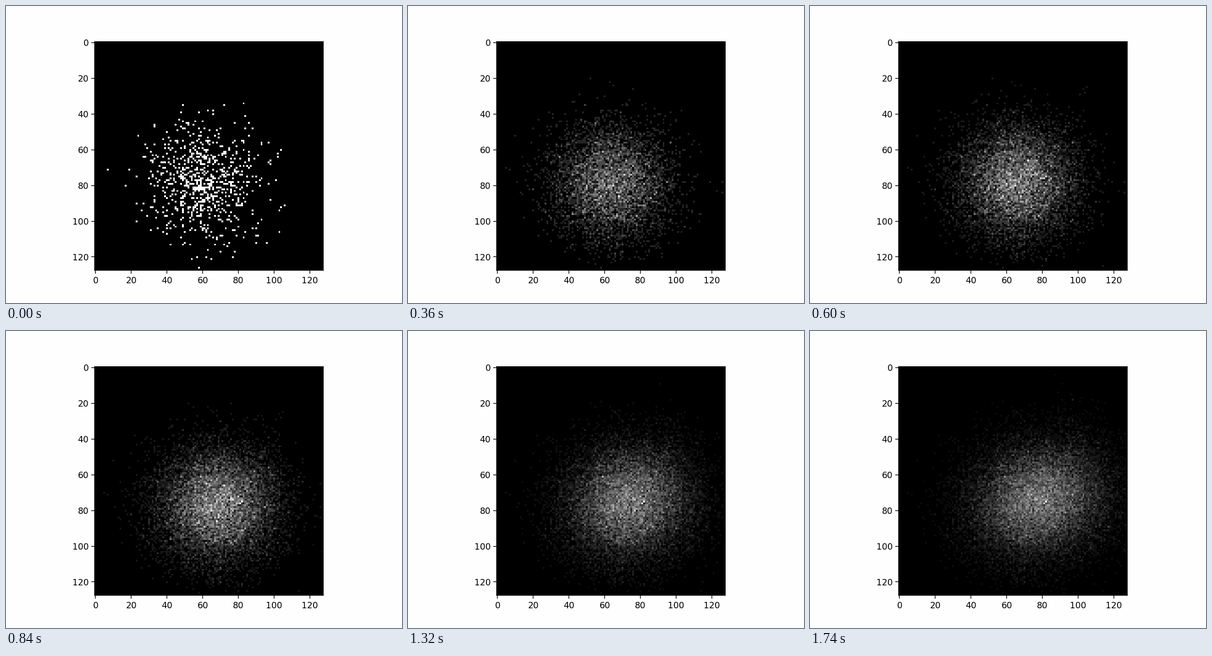
A matplotlib script that plays this animation: 864 px wide and 648 px high, repeating every 1.8 s.

```python
import numpy as np
import matplotlib.pyplot as plt
from matplotlib.animation import FuncAnimation

SIZE = 128
FRAMES = 30
HITS = 780
SIGMA = 16.2
START = np.array([60.0, 80.0])
END = np.array([97.0, 67.5])

rng = np.random.default_rng(7)


def shot(i):
    """Binary detector image of one pulse from the drifting beam."""
    center = START + (END - START) * i / (FRAMES - 1)
    cells = np.rint(rng.normal(center, SIGMA, (HITS, 2))).astype(int)
    x, y = cells[((cells >= 0) & (cells < SIZE)).all(axis=1)].T
    img = np.zeros((SIZE, SIZE))
    img[y, x] = 1
    return img


stack = np.cumsum([shot(i) for i in range(FRAMES)], axis=0)

plt.rcParams["path.snap"] = False
fig, ax = plt.subplots(figsize=(6.4, 4.8), dpi=135, facecolor="#fefefe")
im = ax.imshow(stack[0], cmap="gray", interpolation="nearest")


def update(i):
    im.set_data(stack[i])
    im.set_clim(0, stack[i].max())
    return (im,)


anim = FuncAnimation(fig, update, frames=FRAMES, interval=60,
                     repeat=True, repeat_delay=0)
plt.show()
```
